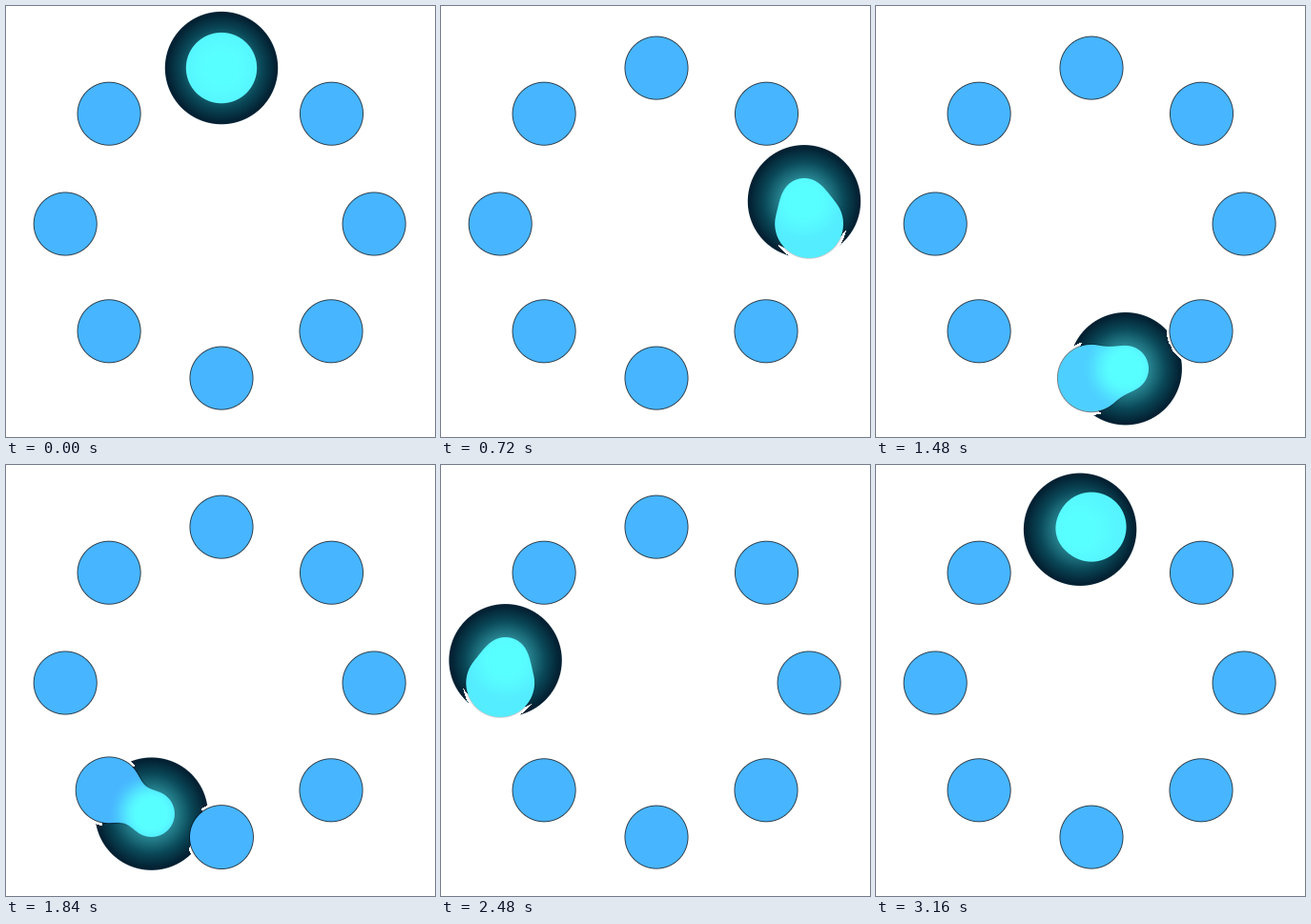
Recreate the animation shown at these times as an HTML page with a canvas. Size 450 by 453 pixels, loop 3.2 s.

```html
<!DOCTYPE html>
<html lang="en">
<head>
<meta charset="utf-8">
<title>Orbiting glow</title>
<style>
  html, body { margin: 0; width: 100%; height: 100%; overflow: hidden; background: #fff; }
  canvas { display: block; }
</style>
</head>
<body>
<canvas id="stage" width="450" height="453"></canvas>
<script>
const W = 450, H = 453, LOOP = 3200, STEP = 40;
const DOT_R = 32.6, BALL_R = 24.3, GLOW_R = 59.2, MID_R = 42;
const DOTS = [[225.5, 64.6], [341, 112.7], [385.6, 228.5], [340.5, 341.3],
              [225.5, 390.6], [107.6, 341.3], [61.7, 228.5], [107.6, 112.7]];
const BLUE = [71, 181, 255], CYAN = [88, 255, 255];
const LINE = [0, 16, 28], DARK = [3, 33, 50], DEEP = [10, 72, 88], TEAL = [40, 134, 146];

const ctx = document.getElementById('stage').getContext('2d');
const image = ctx.createImageData(W, H);
const clamp = v => Math.max(0, Math.min(1, v));
const smooth = (a, b, v) => {
  const u = clamp((v - a) / (b - a));
  return u * u * (3 - 2 * u);
};
const mix = (a, b, u) => a + (b - a) * u;

// Nearest dot and its distance, for every pixel
const nearest = new Uint8Array(W * H), reach = new Float32Array(W * H);
for (let i = 0; i < W * H; i++) {
  reach[i] = Infinity;
  DOTS.forEach(([x, y], n) => {
    const d = Math.hypot(i % W - x, Math.floor(i / W) - y);
    if (d < reach[i]) { reach[i] = d; nearest[i] = n; }
  });
}

// The ball runs from dot to dot, bulging slightly outwards
function ballAt(time) {
  const pos = time / LOOP * DOTS.length, n = Math.floor(pos), u = pos - n;
  const a = DOTS[n], b = DOTS[(n + 1) % DOTS.length];
  const x = mix(a[0], b[0], u), y = mix(a[1], b[1], u);
  const k = 24 * u * (1 - u) / Math.hypot(x - 223.6, y - 227.6);
  return [x + (x - 223.6) * k, y + (y - 227.6) * k];
}

function draw(time) {
  const [bx, by] = ballAt(time), px = image.data;
  const dots = DOTS.map(([x, y]) => {
    const d = Math.hypot(x - bx, y - by);
    return {
      r: DOT_R + 4.6 * clamp(1 - d / 85),
      blend: Math.max(1, Math.min(20, 0.4 * d)),
      heat: 0.85 * smooth(54, 16, d)
    };
  });

  for (let i = 0, o = 0; i < W * H; i++, o += 4) {
    const dx = i % W - bx, dy = Math.floor(i / W) - by;
    const far = Math.sqrt(dx * dx + dy * dy);
    const dot = dots[nearest[i]];
    const toDot = reach[i] - dot.r, toBall = far - BALL_R;
    const h = Math.max(dot.blend - Math.abs(toDot - toBall), 0);
    const edge = Math.min(toDot, toBall) - h * h / (4 * dot.blend);

    // The faint rim of the glow stops just short of a dot
    const rim = toDot < 3.5 && far > 53;
    const glow = rim ? 0 : clamp(GLOW_R + 0.5 - far);
    const fill = clamp(0.5 - edge);
    const line = clamp(1.4 - edge) * 0.85 * (1 - dot.heat) * smooth(20, 50, far);
    const heat = 1 - (1 - dot.heat) * (1 - smooth(46, 14, far));
    const inner = clamp((MID_R - far) / 18), outer = clamp((far - MID_R) / 15);

    for (let c = 0; c < 3; c++) {
      const shade = far < MID_R ? mix(DEEP[c], TEAL[c], inner) : mix(DEEP[c], DARK[c], outer);
      const back = mix(mix(255, shade, glow), LINE[c], line);
      px[o + c] = mix(back, mix(BLUE[c], CYAN[c], heat), fill);
    }
    px[o + 3] = 255;
  }
  ctx.putImageData(image, 0, 0);
}

const start = performance.now();
let shown = -1;
function tick() {
  const time = Math.floor((performance.now() - start) % LOOP / STEP) * STEP;
  if (time !== shown) draw(shown = time);
  requestAnimationFrame(tick);
}
tick();
</script>
</body>
</html>
```
